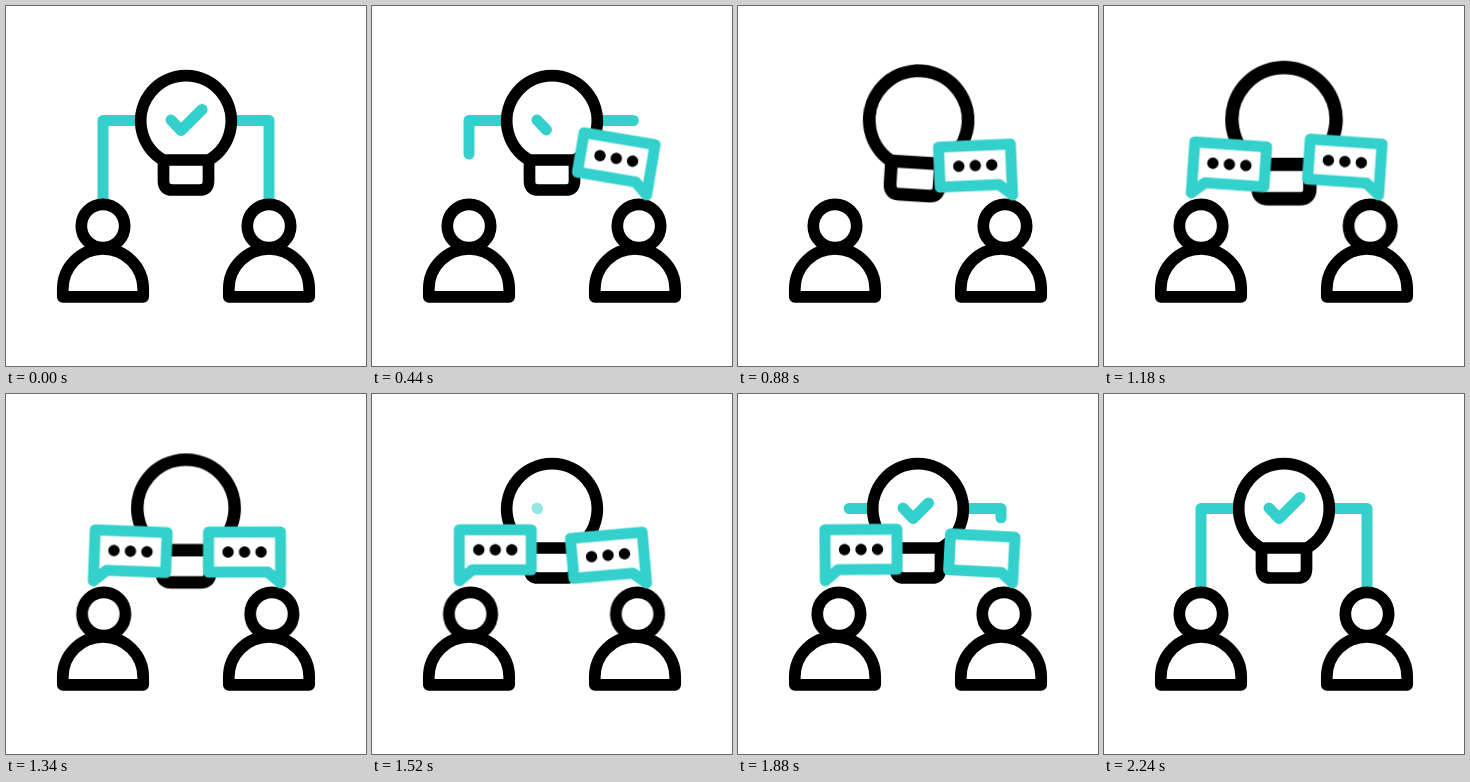
An HTML page that plays this animation: 360x360 px, repeating every 2.4 s.

```html
<!DOCTYPE html>
<html lang="en">
<head>
<meta charset="utf-8">
<title>Shared idea</title>
<style>
html, body { margin: 0; width: 100%; height: 100%; overflow: hidden; background: #fff; }
svg { display: block; width: 100vw; height: 100vh; }
.ink { fill: none; stroke: #000; stroke-width: 11.7; stroke-linecap: round; stroke-linejoin: round; }
.teal { fill: none; stroke: #34d1cc; stroke-width: 11; stroke-linecap: round; stroke-linejoin: round; }
.head, .box { fill: #fff; }
.dots { fill: #000; stroke: none; }
#box { vector-effect: non-scaling-stroke; }

.check, .wire, .head, .bulb, .swing, .pop, .dots circle {
  animation: 2400ms linear infinite;
}
.check, .wire { stroke-dasharray: 1 2; }
.check { animation-name: check; }
.wire.l { animation-name: wire-l; }
.wire.r { animation-name: wire-r; }
.head.l { animation-name: head-l; }
.head.r { animation-name: head-r; }
.bulb { animation-name: bulb; transform-origin: 180px 125px; }
.swing, .pop { animation-timing-function: ease-in-out; }
.l .swing { animation-name: swing-l; }
.r .swing { animation-name: swing-r; }
.l .pop { animation-name: pop-l; }
.r .pop { animation-name: pop-r; }
.dots circle { transform-box: fill-box; transform-origin: center; }
.l .dots circle { animation-name: dots-l; }
.r .dots circle { animation-name: dots-r; }

/* Strokes wipe out and are drawn back in */
@keyframes check {
  0%, 5.42% { stroke-dashoffset: 0; opacity: 1; }
  22.5% { opacity: 1; }
  24.17%, 62.5% { stroke-dashoffset: 1; opacity: 0; }
  62.92% { stroke-dashoffset: 1; }
  64.17% { opacity: 1; }
  81.67%, 100% { stroke-dashoffset: 0; opacity: 1; }
}
@keyframes wire-r {
  0%, 5.42% { stroke-dashoffset: 0; opacity: 1; }
  23% { opacity: 1; }
  24.17%, 70.83% { stroke-dashoffset: 1; opacity: 0; }
  72% { opacity: 1; }
  89.58%, 100% { stroke-dashoffset: 0; opacity: 1; }
}
@keyframes wire-l {
  0%, 11.04% { stroke-dashoffset: 0; opacity: 1; }
  28.6% { opacity: 1; }
  29.79%, 74.58% { stroke-dashoffset: 1; opacity: 0; }
  75.8% { opacity: 1; }
  93.33%, 100% { stroke-dashoffset: 0; opacity: 1; }
}

@keyframes bulb {
  0%, 24% { transform: none; }
  36.67% { transform: rotate(3.6deg) scale(1.09); }
  45.4% { transform: rotate(0deg) scale(1.18); }
  49.17% { transform: rotate(0deg) scale(1.15); }
  62.5%, 100% { transform: none; }
}

@keyframes head-r {
  0%, 3% { transform: none; }
  17%, 37% { transform: translateX(4px); }
  49% { transform: translateX(3.2px); }
  63% { transform: translateX(2.5px); }
  78% { transform: translateX(3px); }
  93%, 100% { transform: none; }
}
@keyframes head-l {
  0%, 49% { transform: none; }
  63% { transform: translateX(1.5px); }
  78% { transform: translateX(4px); }
  93%, 100% { transform: none; }
}

@keyframes swing-r {
  0%, 4% { transform: rotate(-8deg); }
  18.33% { transform: rotate(9.6deg); }
  36.67% { transform: rotate(-2.5deg); }
  49.17% { transform: rotate(4deg); }
  63.33% { transform: rotate(-5deg); }
  78.33% { transform: rotate(3deg); }
  88%, 100% { transform: rotate(0deg); }
}
@keyframes swing-l {
  0%, 38% { transform: rotate(-8deg); }
  49.17% { transform: rotate(4deg); }
  63.33% { transform: rotate(0deg); }
  78.33%, 100% { transform: rotate(-.5deg); }
}
@keyframes pop-r {
  0%, 5% { transform: scale(0); }
  15.5%, 76% { transform: scale(1); }
  86.6%, 100% { transform: scale(0); }
}
@keyframes pop-l {
  0%, 37.5% { transform: scale(0); }
  46%, 80.5% { transform: scale(1); }
  92%, 100% { transform: scale(0); }
}
@keyframes dots-r {
  0%, 13% { transform: scale(0); }
  17.5%, 72.5% { transform: scale(1); }
  76.5%, 100% { transform: scale(0); }
}
@keyframes dots-l {
  0%, 44% { transform: scale(0); }
  48.5%, 79% { transform: scale(1); }
  83%, 100% { transform: scale(0); }
}
</style>
</head>
<body>
<svg viewBox="0 0 360 360">
  <defs>
    <path id="body" d="M-40.2 290.8V283A40.2 40.2 0 0 1 40.2 283V290.8Z"/>
    <path id="box" d="M0 0V-51H72V-11H13Z"/>
  </defs>

  <g class="teal">
    <path class="wire l" pathLength="1" d="M135 114.5H97V194"/>
    <path class="wire r" pathLength="1" d="M225 114.5H263V194"/>
  </g>

  <g class="ink">
    <g class="bulb">
      <path d="M157 154A45.3 45.3 0 1 1 203 154Z"/>
      <path d="M157.5 154V175Q157.5 184 166.5 184H193.5Q202.5 184 202.5 175V154"/>
    </g>
    <use href="#body" x="97"/>
    <use href="#body" x="263"/>
    <circle class="head l" cx="97" cy="220" r="21.7"/>
    <circle class="head r" cx="263" cy="220" r="21.7"/>
  </g>

  <path class="teal check" pathLength="1" d="M165 114L175 124.5L196 103.5"/>

  <g class="teal l" transform="translate(87.3 186.8)">
    <g class="swing"><g class="pop">
      <use class="box" href="#box"/>
      <g class="dots">
        <circle cx="19.5" cy="-31" r="5.7"/>
        <circle cx="36" cy="-31" r="5.7"/>
        <circle cx="52.5" cy="-31" r="5.7"/>
      </g>
    </g></g>
  </g>
  <g class="teal r" transform="translate(274.6 189)">
    <g class="swing"><g class="pop">
      <use class="box" href="#box" transform="scale(-1 1)"/>
      <g class="dots">
        <circle cx="-52.5" cy="-31" r="5.7"/>
        <circle cx="-36" cy="-31" r="5.7"/>
        <circle cx="-19.5" cy="-31" r="5.7"/>
      </g>
    </g></g>
  </g>
</svg>
</body>
</html>
```
